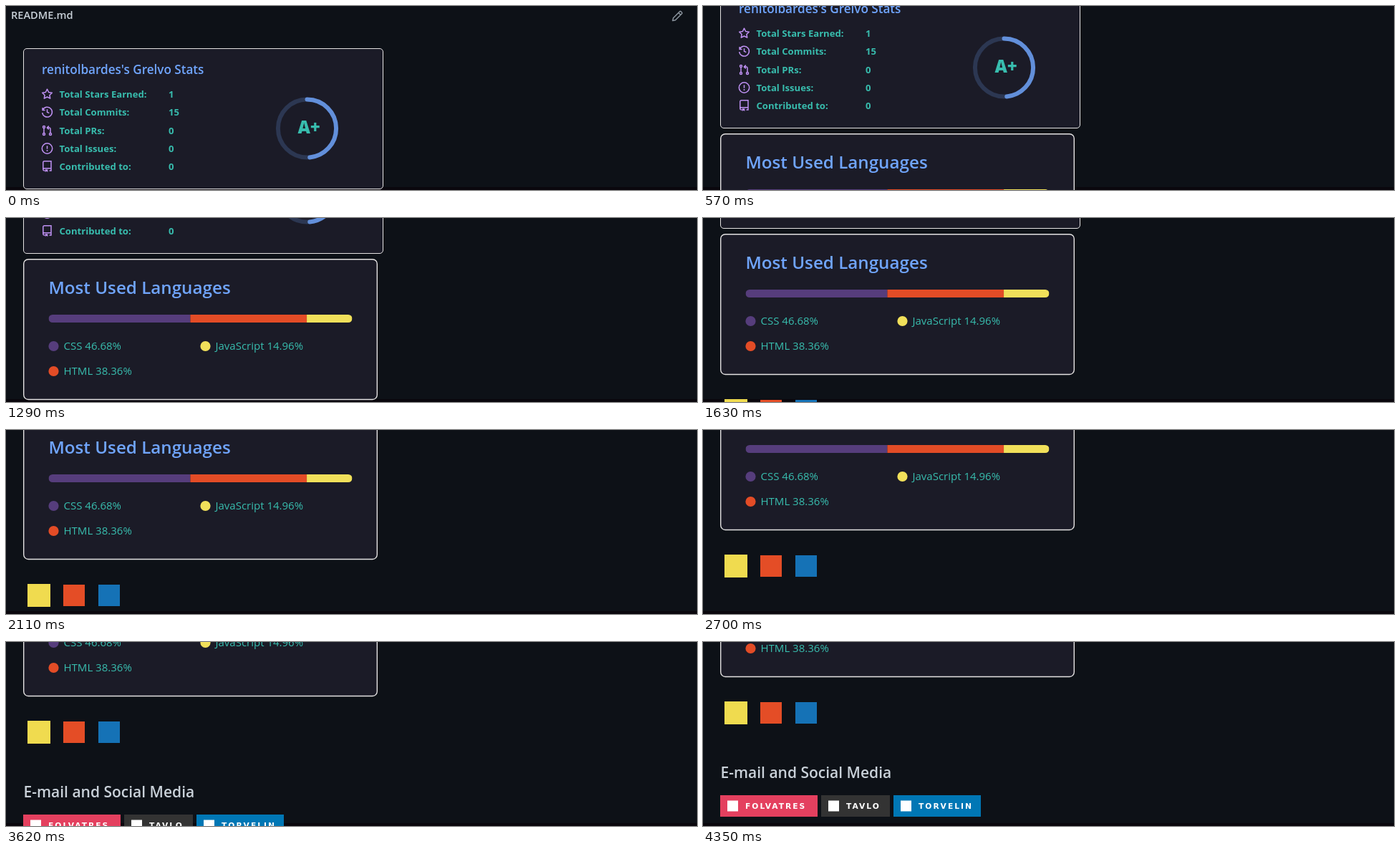
An HTML page that plays this animation: 965x257 px, repeating every 4.93 s.

```html
<!DOCTYPE html>
<html lang="en">
<head>
<meta charset="utf-8">
<title>Profile readme scroll</title>
<style>
  html, body { margin: 0; width: 100%; height: 100%; overflow: hidden; background: #0d1117; }
  svg { display: block; }
  text { font-family: "Open Sans", "Noto Sans", sans-serif; white-space: pre; }
  .semi { font-weight: 600; }
  .light { fill: #c9d1d9; }
  .blue { fill: #70a5fd; }
  .teal { fill: #38bdae; }
  .card { fill: #1b1b27; stroke: #e4e2e2; }
  .stat { font-size: 13.1px; font-weight: 700; }
  .lang { font-size: 15px; }
  .icon { fill: none; stroke: #bf91f3; stroke-width: 1.5; }
  .icon .solid { fill: #bf91f3; stroke: none; }
  .ring { fill: none; stroke: #70a5fd; stroke-width: 6; }
  .badge { font: 700 10.7px "DejaVu Sans", Verdana, sans-serif; letter-spacing: 2px; fill: #fff; }
</style>
</head>
<body>
<svg width="965" height="257" viewBox="0 0 965 257">
  <rect width="965" height="257" fill="#0d1117"/>
  <rect y="253" width="965" height="4" fill="#0a070d"/>
  <g id="page">
    <text class="semi light" x="7" y="18" font-size="14.6">README.md</text>
    <path transform="translate(930 6)" fill="none" stroke="#8b949e" stroke-width="1.5" stroke-linejoin="round"
      d="M1 14.5l.9-3.8L10.8 1.8a1.3 1.3 0 0 1 1.8 0l1.2 1.2a1.3 1.3 0 0 1 0 1.8L4.8 13.7zM9.2 3.5l2.9 2.9"/>

    <rect class="card" x="24.5" y="59.5" width="502" height="196" rx="4.5"/>
    <text class="semi blue" x="50" y="95" font-size="17.1">renitolbardes's Grelvo Stats</text>
    <g id="stats"></g>
    <circle class="ring" cx="420.5" cy="171" r="40.6" opacity=".2"/>
    <circle class="ring" cx="420.5" cy="171" r="40.6" opacity=".8" pathLength="100"
      stroke-dasharray="48.5 100" stroke-linecap="round" transform="rotate(-90 420.5 171)"/>
    <text class="teal" x="407.5" y="178" font-size="24" font-weight="800">A+</text>

    <rect class="card" x="24.7" y="263.7" width="493.6" height="195.8" rx="6.4" stroke-width="1.4"/>
    <text class="semi blue" x="59.5" y="312" font-size="24.2">Most Used Languages</text>
    <clipPath id="pill"><rect x="59.5" y="341" width="424" height="11" rx="5.5"/></clipPath>
    <g id="bar" clip-path="url(#pill)"></g>
    <g id="langs"></g>

    <rect x="30" y="494" width="32" height="32" fill="#f0db4f"/>
    <rect x="80" y="495" width="30" height="30" fill="#e44d26"/>
    <rect x="129" y="495" width="30" height="30" fill="#1572b6"/>

    <text class="semi light" x="24.5" y="601" font-size="21">E-mail and Social Media</text>
    <g id="badges"></g>
  </g>
</svg>
<script>
const LOOP = 4930;
const $ = id => document.getElementById(id);
const fill = (id, items, draw) => { $(id).innerHTML = items.map(draw).join(""); };

const icons = {
  star: '<path stroke-linejoin="round" d="M8 1.2l2.1 4.3 4.7.7-3.4 3.3.8 4.7L8 12l-4.2 2.2.8-4.7L1.2 6.2l4.7-.7z"/>',
  history: '<path d="M1.8 5.2A6.9 6.9 0 1 1 1.2 9M1.6 2v3.5h3.5M8 4.3v4l2.8 1.3"/>',
  pull: '<path d="M3.5 4.5v7M12.5 11.5V5.5A1.5 1.5 0 0 0 11 4H8.6M10.3 1.6L7.9 4l2.4 2.4"/>' +
    '<circle cx="3.5" cy="3" r="1.5"/><circle cx="3.5" cy="13" r="1.5"/><circle cx="12.5" cy="13" r="1.5"/>',
  issue: '<circle cx="8" cy="8" r="7.2"/><path d="M8 4.3v4.4"/><circle class="solid" cx="8" cy="11" r="1"/>',
  repo: '<path d="M5 14H4a1.7 1.7 0 0 1-1.7-1.7V2.5A1.7 1.7 0 0 1 4 .8h9.5V14H11M2.3 12.3A1.7 1.7 0 0 1 4 10.7h9.5"/>' +
    '<path class="solid" d="M5.2 12.2h3.6V16L7 14.7 5.2 16z"/>'
};

fill("stats", [
  ["star", "Total Stars Earned:", 1],
  ["history", "Total Commits:", 15],
  ["pull", "Total PRs:", 0],
  ["issue", "Total Issues:", 0],
  ["repo", "Contributed to:", 0]
], ([icon, label, value], i) => {
  const y = Math.round(128 + 25.3 * i);
  return `<g class="icon" transform="translate(49.5 ${y - 13})">${icons[icon]}</g>
    <text class="stat teal" x="74.5" y="${y}">${label}</text>
    <text class="stat teal" x="227" y="${y}">${value}</text>`;
});

const langs = [
  ["CSS", 46.68, "#563d7c", 66.5, 385],
  ["HTML", 38.36, "#e34c26", 66.5, 420],
  ["JavaScript", 14.96, "#f1e05a", 278.5, 385]
];
let barX = 59.5;
fill("bar", langs, ([, share, color]) => {
  const width = 4.24 * share, x = barX;
  barX += width;
  return `<rect x="${x}" y="341" width="${width}" height="11" fill="${color}"/>`;
});
fill("langs", langs, ([name, share, color, x, y]) =>
  `<circle cx="${x}" cy="${y}" r="7.1" fill="${color}"/>
   <text class="lang teal" x="${x + 14}" y="${y + 5}">${name} ${share}%</text>`);

fill("badges", [
  ["FOLVATRES", 24, 136, "#e4405f"],
  ["TAVLO", 165, 96, "#333333"],
  ["TORVELIN", 266, 122, "#0077b5"]
], ([name, x, width, color]) =>
  `<rect x="${x}" y="625" width="${width}" height="30" fill="${color}"/>
   <rect x="${x + 10}" y="632.5" width="15" height="15" fill="#fff"/>
   <text class="badge" x="${x + 35}" y="644">${name}</text>`);

// Scroll bursts: first change, last change (ms), number of jumps, offset reached
const bursts = [
  [140, 640, 17, 103], [670, 950, 9, 160], [980, 1170, 7, 195], [1200, 1690, 15, 248],
  [1730, 2200, 14, 288], [2310, 2830, 14, 333], [2860, 2960, 2, 340], [3100, 3620, 15, 384],
  [3650, 3840, 7, 401], [4000, 4110, 3, 407], [4320, 4350, 2, 411]
];

function scrollAt(t) {
  let y = 0;
  for (const [from, to, jumps, end] of bursts) {
    if (t < from) break;
    const done = Math.min(jumps, Math.floor((t - from) / (to - from) * (jumps - 1) + 1e-6) + 1);
    y += (end - y) * done / jumps;
  }
  return Math.round(y);
}

const start = performance.now();
function frame() {
  const t = Math.max(0, performance.now() - start) % LOOP;
  $("page").setAttribute("transform", `translate(0 ${-scrollAt(t)})`);
  requestAnimationFrame(frame);
}
frame();
</script>
</body>
</html>
```
